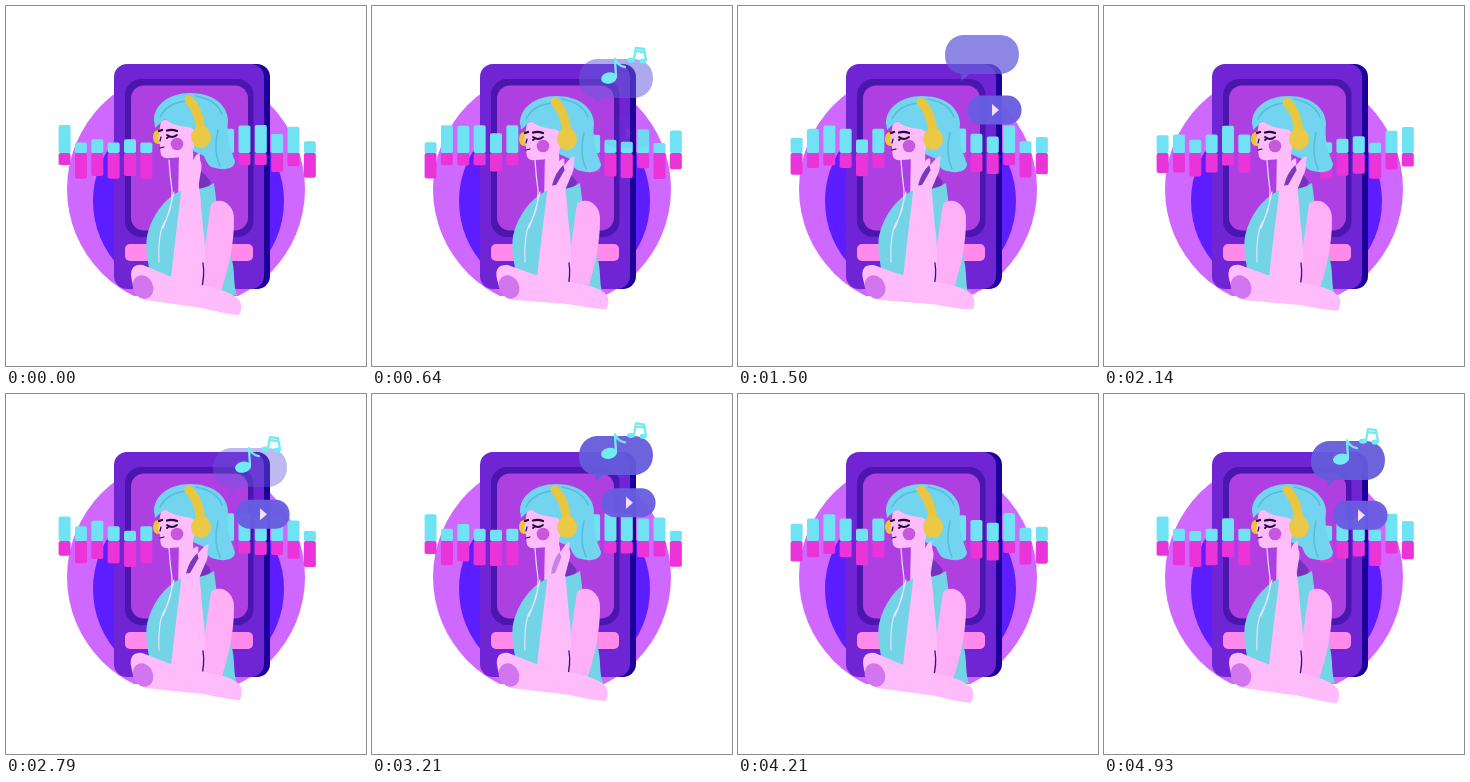
An HTML page that plays this animation: 360 px wide and 360 px high, repeating every 5 s.

```html
<!DOCTYPE html>
<html lang="en">
<head>
<meta charset="utf-8">
<title>Listening to music</title>
<style>
html, body { margin: 0; width: 100%; height: 100%; overflow: hidden; background: #fff; }
svg { display: block; width: 100vw; height: 100vh; }
.hair { fill: #72d4ef; }
.skin { fill: #ffbcfa; }
.arm { fill: #ffaff6; }
.top { fill: #72d4e4; }
.line { fill: none; stroke-linecap: round; stroke-linejoin: round; }
.ink { stroke: #1a0a3c; }
.strand { stroke: #55bcdc; }
.note { stroke: #72eaf4; stroke-width: 2.3; }
</style>
</head>
<body>
<svg viewBox="0 0 360 360">
  <clipPath id="floor"><rect width="360" height="290"/></clipPath>
  <g clip-path="url(#floor)">
    <circle cx="180" cy="183" r="119" fill="#cf68ff"/>
    <circle cx="182.500" cy="195" r="95.500" fill="#5d1eff"/>
  </g>

  <g id="phone">
    <rect x="118" y="58" width="146" height="225" rx="13" fill="#1d0099"/>
    <rect x="108" y="58" width="150" height="225" rx="13" fill="#6f25d3"/>
    <rect x="119" y="73" width="128.500" height="158" rx="16" fill="#4b16ad"/>
    <rect x="125" y="79.500" width="117" height="145" rx="13" fill="#ae40e2"/>
    <rect x="119" y="238" width="128" height="17" rx="5" fill="#ff8aec"/>
  </g>

  <g id="bars"></g>

  <g id="note-bubble">
    <path id="cloud" fill="#665bdc" d="M226 0H262C274 0 281 9 281 19C281 31 273 39 261 39H231L223 46L224 39C213 38 207 31 207 20C207 8 215 0 226 0Z"/>
    <g id="notes" fill="#72eaf4">
      <ellipse cx="237" cy="19" rx="8" ry="5.500" transform="rotate(-12 237 19)"/>
      <path class="line note" d="M244 18L243 0Q246 7 253 8"/>
      <ellipse cx="259" cy="1" rx="4" ry="2.600"/>
      <ellipse cx="271" cy="2" rx="3.500" ry="2.600"/>
      <path class="line note" d="M262 0L264 -11L272 -10L274 1M264 -8L272 -7"/>
    </g>
  </g>

  <g id="play-bubble">
    <rect x="229.500" y="-14.500" width="54" height="29" rx="14" fill="#685de2"/>
    <path d="M254 -6L261 0L254 6Z" fill="#fbe6ff"/>
  </g>

  <g id="head">
    <path class="hair" d="M148 116C147 99 163 87 184 87C206 87 221 98 222 114C220 132 225 145 229 155C229 162 220 165 209 162Q202 162 198 150L176 140L160 112Z"/>
    <path class="line strand" d="M190 90Q211 94 216 108M212 124Q207 145 214 160" stroke-width="1.500"/>
  </g>

  <path class="skin" d="M173 145H187L188 172Q194 181 205 184L200 199H172Z"/>
  <path fill="#7432bd" d="M187 162Q196 163 205 176L199 188Q190 183 184 177Z"/>
  <path class="top" d="M174 185C158 193 146 209 141 230C139 244 142 254 144 269L180 285L231 289C226 276 231 262 222 242L211 200L208 177Q196 185 184 182Z"/>

  <g id="face">
    <ellipse cx="152" cy="132" rx="5" ry="7" fill="#ebc62f"/>
    <path class="skin" d="M155 116L152 134L154 140L154.500 147Q155 154 163 153Q181 153 188 143L190 118Q172 108 155 116Z"/>
    <path class="hair" d="M149 123C146 101 164 89 186 92L198 126L190 131Q189 122 180 122Q165 120 159 114Q154 118 149 123Z"/>
    <path class="line strand" d="M154 112Q161 98 180 96" stroke-width="1.500"/>
    <circle cx="171" cy="139" r="6.300" fill="#c857df"/>
    <path class="line ink" d="M153 126L156 125M161 125.500Q166 124 171 126" stroke-width="2.300"/>
    <path class="line ink" d="M161 130Q166 134 171 130M163 131L161 133" stroke-width="1.800"/>
    <path class="line ink" d="M155 132L154 136M154 143L158 142" stroke-width="1.200"/>
    <path class="line" d="M183 95Q193 105 195 126" stroke="#e9c640" stroke-width="9"/>
    <ellipse cx="195" cy="132" rx="10" ry="11" fill="#e9c945"/>
  </g>

  <path class="line" d="M163 154Q164 170 166 184Q167 204 157 219Q152 231 153 256M168 186Q163 208 157 222" stroke="#e4e2ff" stroke-width="1.200"/>

  <path class="arm" d="M205 198C214 190 229 198 228 214Q228 248 214 288L194 288L199 239Z"/>
  <path class="skin" d="M176 176Q182 168 192 177C195 187 195 205 198 229Q201 262 196 283L164 284C167 250 171 220 174 196Z"/>
  <path class="line" d="M197 257Q199 270 195 285" stroke="#32108d" stroke-width="1.300"/>
  <g id="hand">
    <path class="skin" d="M175 186Q175 170 181 158Q184 150 187 152L188 158Q194 147 197 148L197 156Q199 160 196 169L192 185Q184 192 175 186Z"/>
    <path id="gap" fill="#7a36c0" d="M187 158L189 163L183 179L179 180Q180 167 187 158Z"/>
  </g>

  <g id="forearm">
    <path class="skin" d="M125 269Q125 257 137 259L163 270Q191 278 211 283Q228 287 234 295Q237 302 233 309Q224 309 196 302L139 294Q127 289 125 269Z"/>
    <ellipse cx="137" cy="281" rx="10" ry="12" fill="#d276f0" transform="rotate(-24 137 281)"/>
  </g>
</svg>
<script>
const LOOP = 5000, STEPS = 70;
const $ = id => document.getElementById(id);
const clamp = v => Math.max(0, Math.min(1, v));
const smooth = u => { u = clamp(u); return u * u * (3 - 2 * u); };
const rise = (x, from, to) => clamp((x - from) / (to - from));
// fades in between a and b, out between c and d
const pulse = (x, a, b, c, d) => rise(x, a, b) * (1 - rise(x, c, d));
const since = (starts, n) => n - starts.filter(s => s <= n).pop();
const place = (id, transform) => $(id).setAttribute("transform", transform);
const fade = (id, v) => $(id).setAttribute("opacity", v);

// equalizer: each column slides up and down, peaking at its own part of the beat
const MIDDLE = 147, PITCH = 16.35, BEAT = 0.157;
const leftPeaks = [0.98, 0.45, 0.35, 0.45, 0.65, 0.45];
const rightPeaks = [0.15, 0.05, 0, 0.25, 0.9, 0.6];

function addRect(x, fill) {
  const r = document.createElementNS("http://www.w3.org/2000/svg", "rect");
  const attrs = { x, y: MIDDLE, width: 12, rx: 1.8, fill };
  for (const k in attrs) r.setAttribute(k, attrs[k]);
  return $("bars").appendChild(r);
}
function addBars(first, peaks) {
  return peaks.map((peak, i) => {
    const x = 52.6 + (first + i) * PITCH;
    return { peak, low: addRect(x, "#ea34da"), high: addRect(x, "#6fe2f3") };
  });
}
const bars = [...addBars(0, leftPeaks), ...addBars(10, rightPeaks)];

function drawBars(n) {
  for (const { peak, low, high } of bars) {
    const swing = Math.cos(2 * Math.PI * (n * BEAT - peak));
    const up = 19 + 9 * swing;
    high.setAttribute("y", MIDDLE - up);
    high.setAttribute("height", up);
    low.setAttribute("height", 19 - 7 * swing);
  }
}

// both bubbles fade in, drift upwards and fade out
function drawBubbles(n) {
  const a = since([0, 30.5, 57], n);
  place("note-bubble", `translate(0 ${71 - 2 * a})`);
  fade("cloud", 0.95 * pulse(a, 6.5, 11, 20, 24.5));
  place("notes", `translate(0 ${-0.3 * (a - 9)})`);
  fade("notes", pulse(a, 5.5, 8, 16, 20.7));

  const b = since([0, 26.5, 57], n);
  place("play-bubble", `translate(0 ${144 - 1.9 * b})`);
  fade("play-bubble", 0.96 * pulse(b, 8.8, 11.8, 21.5, 25.5));
}

function drawFigure(n) {
  const wake = smooth(n / 9);
  place("head", `translate(0 ${3 * wake})`);
  place("face", `translate(0 ${2 * wake - 1})`);

  const lift = wake * (1 - smooth((n - 15) / 50));
  place("forearm", `rotate(${-3.5 * lift} 137 280)`);

  const open = wake * (1 - smooth((n - 39) / 11));
  place("hand", `rotate(${14 * open - 5} 183 186)`);
  fade("gap", open);
}

function draw(ms) {
  const n = Math.floor(((ms % LOOP) + 5) * STEPS / LOOP) % STEPS;
  drawBars(n);
  drawBubbles(n);
  drawFigure(n);
}

const start = performance.now();
function tick() {
  draw(performance.now() - start);
  requestAnimationFrame(tick);
}
tick();
</script>
</body>
</html>
```
